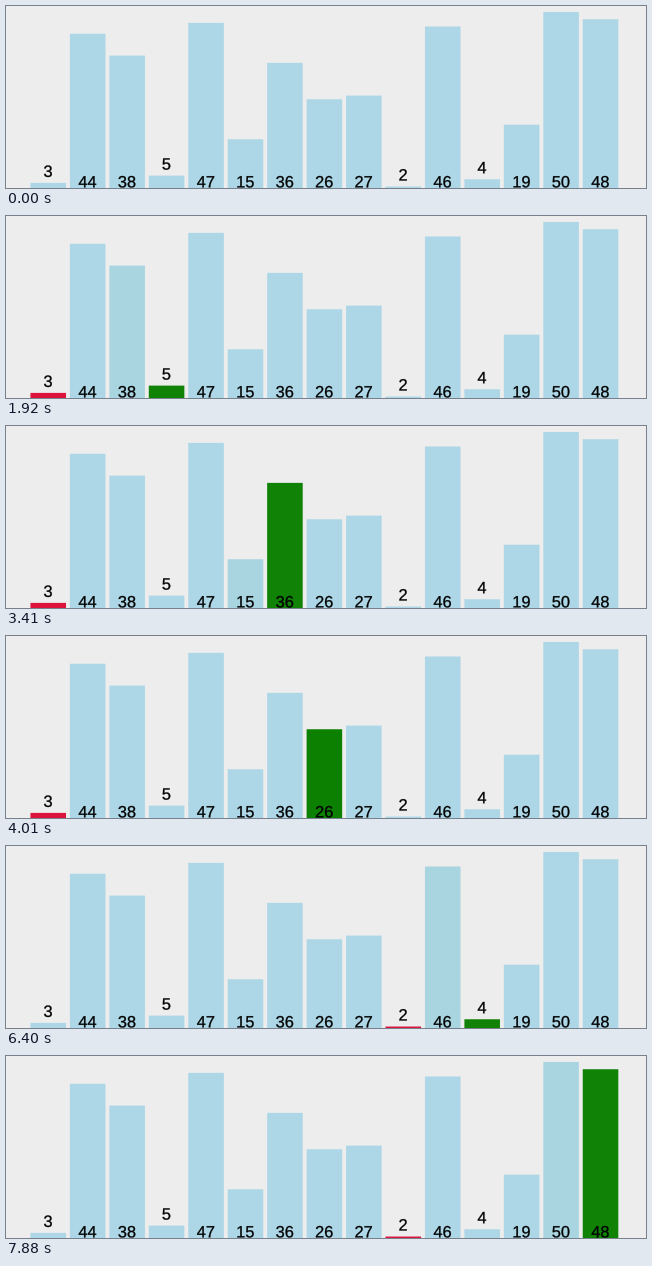
These frames come from a looping animation (640 by 182 pixels, 8 s). A matplotlib script:

```python
import matplotlib.pyplot as plt
import numpy as np
from matplotlib.animation import FuncAnimation
from matplotlib.colors import to_rgb
from matplotlib.patches import PathPatch, Rectangle
from matplotlib.textpath import TextPath

W, H, DPI = 640, 182, 100
LOOP, INTERVAL = 8000, 20

VALUES = [3, 44, 38, 5, 47, 15, 36, 26, 27, 2, 46, 4, 19, 50, 48]
IDLE, SCAN, LOWEST = (np.array(to_rgb(c)) for c in ("#add7e6", "#0c8000", "#dc143c"))

# The picture refreshes once per tick; the search advances every 10/3 ticks
TICK, LEAD = 148.9, 20
FIRST, STRIDE = 1.68, 10 / 3
FADE = 240

PITCH, BAR_W = 39.45, 35.57
FONT = 16.4


def search_steps():
    """Colour changes made by each step of one selection-sort pass."""
    low = 0
    steps = [[(0, LOWEST)]]
    for i in range(1, len(VALUES)):
        step = [(i, SCAN)]
        if i - 1 != low:
            step.append((i - 1, IDLE))
        steps.append(step)
        if VALUES[i] < VALUES[low]:
            steps.append([(low, IDLE), (i, LOWEST)])
            low = i
    return steps


STEPS = search_steps()


def ease(p):
    """Cubic ease in and out."""
    p = min(max(p, 0), 1)
    return 4 * p ** 3 if p < 0.5 else 1 - 4 * (1 - p) ** 3


def colours_at(t):
    tick = (t + LEAD) // TICK
    colours = [IDLE] * len(VALUES)
    for n, step in enumerate(STEPS):
        share = ease((tick - FIRST - STRIDE * n) * TICK / FADE)
        for i, target in step:
            colours[i] = colours[i] + (target - colours[i]) * share
    return colours


def add_label(text, x, y):
    left = x - 0.278 * FONT * len(text)
    path = TextPath((left, y), text, size=FONT, prop={"family": "Liberation Sans"})
    ax.add_patch(PathPatch(path, fc="black", ec="black", lw=0.2))


def add_bar(i, value):
    x = 24.45 + PITCH * i
    height = 3.637 * value - 5.8
    bar = Rectangle((x, 0), BAR_W, height, lw=0, fc=IDLE, snap=False)
    ax.add_patch(bar)
    # Short bars carry their number on top
    add_label(str(value), x + BAR_W / 2 - 0.2, height + 6 if height < FONT else 0.6)
    return bar


fig = plt.figure(figsize=(W / DPI, H / DPI), dpi=DPI, facecolor="#ededed")
ax = fig.add_axes([0, 0, 1, 1])
ax.set_xlim(0, W)
ax.set_ylim(0, H)
ax.axis("off")
bars = [add_bar(i, value) for i, value in enumerate(VALUES)]


def draw(frame):
    for bar, colour in zip(bars, colours_at((frame + 0.5) * INTERVAL)):
        bar.set_facecolor(colour)
    return bars


anim = FuncAnimation(fig, draw, frames=LOOP // INTERVAL, interval=INTERVAL,
                     init_func=lambda: draw(0), repeat=True, repeat_delay=0)
plt.show()
```
